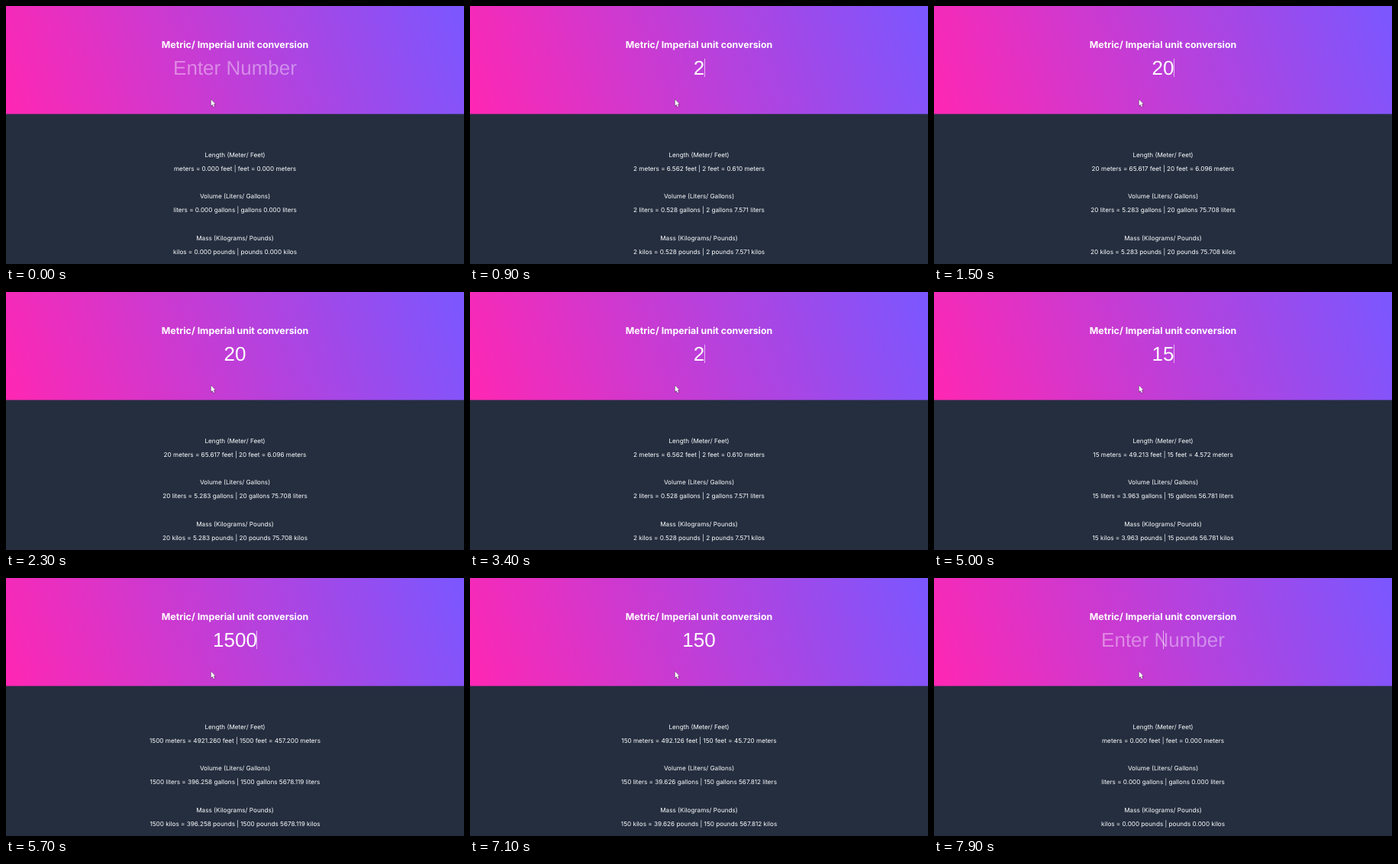
An HTML page with a canvas that plays this animation: 600 px wide and 338 px high, repeating every 8 s.

```html
<!DOCTYPE html>
<html lang="en">
<head>
<meta charset="utf-8">
<title>Unit conversion</title>
<style>
  html, body { margin: 0; width: 100%; height: 100%; overflow: hidden; background: #242e3f; }
  canvas { display: block; width: 600px; height: 338px; }
</style>
</head>
<body>
<canvas id="stage"></canvas>
<script>
const W = 600, H = 338, MID = W / 2, HEADER = 141.5, LOOP = 8000;
const BLINK = 530;
const canvas = document.getElementById('stage');
const ratio = window.devicePixelRatio || 1;
canvas.width = W * ratio;
canvas.height = H * ratio;
const ctx = canvas.getContext('2d');
ctx.scale(ratio, ratio);
ctx.textRendering = 'geometricPrecision';

// [time, field value, caret restarts its blink]
const edits = [
  [0, '', false], [300, '', true],
  [500, '2', true], [1500, '20', true],
  [3300, '2', true], [3500, '', true],
  [4800, '1', true], [5000, '15', true], [5200, '150', true], [5400, '1500', true],
  [7100, '150', false], [7300, '15', true], [7500, '1', true], [7700, '', true]
];

const inter = (weight, size) => `${weight} ${size}px Inter, sans-serif`;

// One type size per style, taken from the ink width of a sample line.
function typeSize(weight, sample, ink) {
  const base = 12;
  ctx.font = inter(weight, base);
  const m = ctx.measureText(sample);
  return base * ink / (m.actualBoundingBoxLeft + m.actualBoundingBoxRight);
}

const heading = 'Metric/ Imperial unit conversion';
const headingFont = inter(700, typeSize(700, heading, 192.3));
const bodyFont = inter(400, typeSize(400, 'kilos = 0.000 pounds | pounds 0.000 kilos', 162.3));
const fieldFont = '26px "Liberation Sans", Arial, sans-serif';

function text(str, y, font, color = '#fff') {
  ctx.font = font;
  ctx.fillStyle = color;
  ctx.textAlign = 'center';
  ctx.fillText(str, MID, y);
}

function headerFill() {
  const angle = 70 * Math.PI / 180;
  const sx = Math.sin(angle), cy = Math.cos(angle);
  const half = (W * sx + HEADER * cy) / 2;
  const y = HEADER / 2;
  const g = ctx.createLinearGradient(MID - sx * half, y + cy * half, MID + sx * half, y - cy * half);
  g.addColorStop(0, '#ff27b3');
  g.addColorStop(1, '#7a57ff');
  return g;
}
const gradient = headerFill();

function bodyLines(value) {
  const n = Number(value);
  const pre = value ? value + ' ' : '';
  const times = k => (n * k).toFixed(3);
  const over = k => (n / k).toFixed(3);
  const FEET = 3.28084, GALLONS = 0.264172;
  return [
    'Length (Meter/ Feet)',
    `${pre}meters = ${times(FEET)} feet | ${pre}feet = ${over(FEET)} meters`,
    '',
    'Volume (Liters/ Gallons)',
    `${pre}liters = ${times(GALLONS)} gallons | ${pre}gallons ${over(GALLONS)} liters`,
    '',
    'Mass (Kilograms/ Pounds)',
    `${pre}kilos = ${times(GALLONS)} pounds | ${pre}pounds ${over(GALLONS)} kilos`
  ];
}

function drawField(value, caret) {
  text(value || 'Enter Number', 90.3, fieldFont, value ? '#fff' : 'rgba(255,255,255,.4)');
  if (!caret) return;
  const w = value ? ctx.measureText(value).width : 0;
  ctx.fillStyle = 'rgba(255,255,255,.62)';
  ctx.fillRect(Math.floor(MID + w / 2), 69, 1, 24);
}

function drawPointer() {
  const p = new Path2D('M0 0V8.2L1.9 6.5L3.2 9.5L4.6 8.9L3.3 6H5.8Z');
  ctx.save();
  ctx.translate(268.6, 122.6);
  ctx.lineWidth = 0.9;
  ctx.strokeStyle = 'rgba(30,15,40,.8)';
  ctx.stroke(p);
  ctx.fillStyle = '#fff';
  ctx.fill(p);
  ctx.restore();
}

function draw(t) {
  const past = edits.filter(e => e[0] <= t);
  const value = past[past.length - 1][1];
  const restarts = past.filter(e => e[2]);
  const caret = restarts.length > 0 &&
    Math.floor((t - restarts[restarts.length - 1][0]) / BLINK) % 2 === 0;

  ctx.fillStyle = '#242e3f';
  ctx.fillRect(0, 0, W, H);
  ctx.fillStyle = gradient;
  ctx.fillRect(0, 0, W, HEADER);
  text(heading, 54.8, headingFont);
  drawField(value, caret);
  bodyLines(value).forEach((line, i) => text(line, 197.6 + i * 18.2, bodyFont));
  drawPointer();
}

const start = performance.now();
function frame() {
  draw((performance.now() - start) % LOOP);
  requestAnimationFrame(frame);
}
frame();
</script>
</body>
</html>
```
